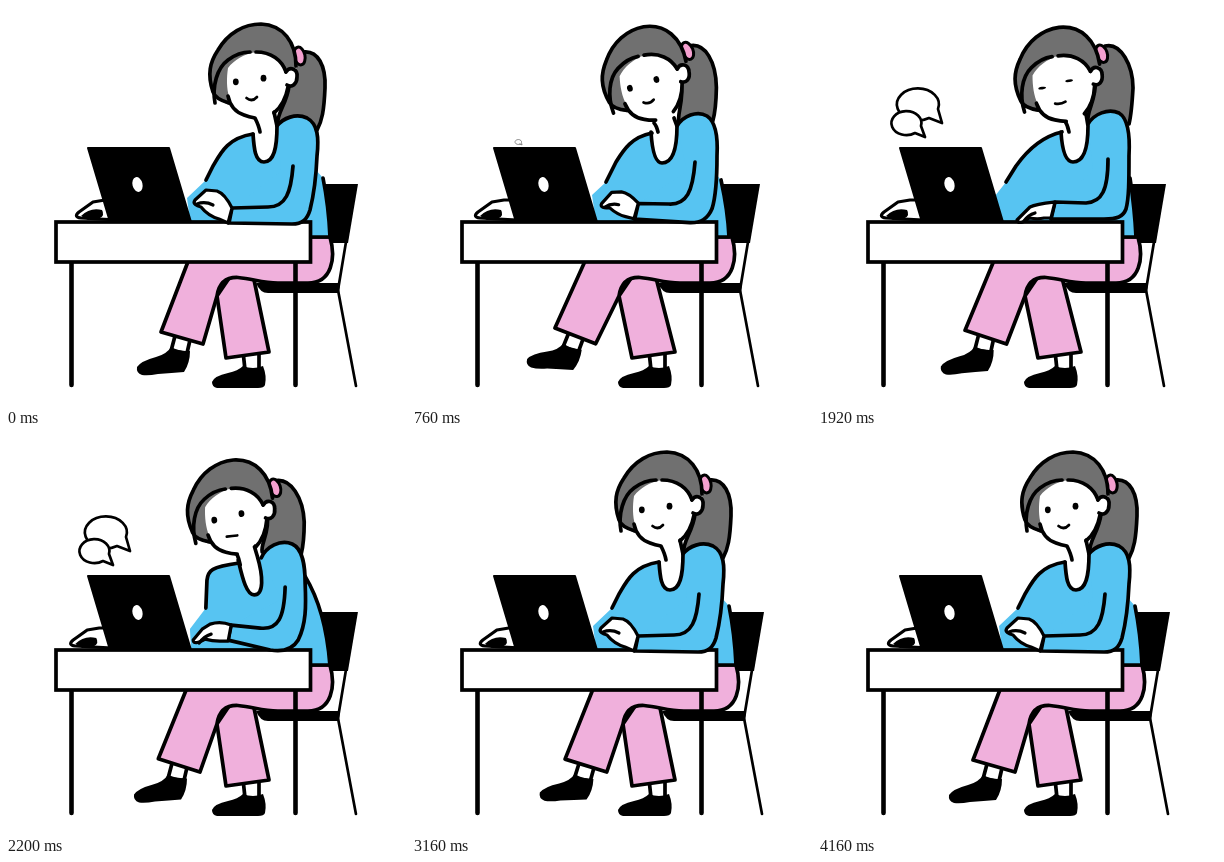
Recreate the animation shown at these times as an HTML page. Size 400 px wide and 400 px high, loop 4200 ms.

```html
<!DOCTYPE html>
<html lang="en">
<head>
<meta charset="utf-8">
<title>Chatting at the desk</title>
<style>
  html, body { margin: 0; width: 100%; height: 100%; overflow: hidden; background: #fff; }
  svg { display: block; width: 100%; height: 100%; }
  .ink { fill: none; stroke: #000; stroke-width: 3.7; stroke-linecap: round; stroke-linejoin: round; }
  .thin { stroke-width: 2.7; }
  .white { fill: #fff; }
  .blue { fill: #57c4f2; }
  .pink { fill: #f0b0dc; }
  .grey { fill: #707070; }
</style>
</head>
<body>
<svg viewBox="0 0 400 400">
  <g id="chair">
    <path d="M310 178H352L342 237H316Z"/>
    <path class="ink thin" d="M340 236L332 284L350 380"/>
    <path d="M250 277H334L333 287H262Q254 287 250 277Z"/>
  </g>

  <path class="ink white" d="M237 345L239 364H253V345"/>
  <path d="M206 376Q208 370 222 367Q232 365 237 360Q247 364 257 360Q261 370 259 379Q258 382 252 382H211Q206 381 206 376Z"/>
  <path id="leg" class="ink pink"/>
  <g id="foot">
    <path class="ink white" d="M169 330L165 345L181 347L184 334"/>
    <path d="M165 341Q174 346 184 345Q184 357 178 366Q166 367 152 368Q142 370 136 369Q130 367 131 361Q135 355 150 351Q161 348 165 341Z"/>
  </g>
  <path id="shin" class="ink pink"/>

  <path id="tail" class="ink grey"/>
  <path id="neck" class="white"/>
  <path id="trunk" class="blue"/>
  <path id="back" class="ink"/>
  <path id="left" class="ink"/>

  <g id="farHand">
    <path class="ink white" style="stroke-width:3.2" d="M112 214L75 212Q67 211 73 206L87 196L99 194H112"/>
    <path d="M75 210Q84 201 96 204Q99 209 94 212L82 214Z"/>
  </g>
  <path id="big" class="ink white thin" d="M111 112L124 117L120 103A21 16 0 1 0 111 112Z"/>
  <path id="small" class="ink white thin" d="M97 127L107 131L103 120A15 12 0 1 0 97 127Z"/>

  <path class="ink" style="stroke-width:4.6" d="M65.5 256V379M289.5 256V379"/>
  <rect class="ink white" style="stroke-linejoin:miter" x="50" y="216" width="254.5" height="40"/>
  <path d="M82 142H163L185 216H104Z" stroke="#000" stroke-width="2" stroke-linejoin="round"/>
  <ellipse class="white" cx="131.5" cy="178.5" rx="5" ry="7.5" transform="rotate(-14 131.5 178.5)"/>

  <path id="armFill" class="blue"/>
  <path id="arm" class="ink"/>
  <path id="collar" class="ink"/>
  <path id="throat" class="ink"/>

  <g id="head">
    <ellipse class="ink" style="fill:#f5a0d0;stroke-width:3" cx="293.5" cy="50" rx="5.5" ry="9" transform="rotate(-12 293.5 50)"/>
    <path class="grey" d="M207 86C201 68 204 56 212 44C222 27 238 18 255 18C277 19 290 36 290 62L279 68L226 100C219 98 210 93 207 86Z"/>
    <path class="white" d="M222 62C219 82 222 103 240 110C256 116 268 106 276 94C281 86 282 82 281 80V66C276 52 264 46 250 46C238 48 228 54 222 62Z"/>
    <path class="ink" d="M223 97C216 95 209 92 207 86C201 68 204 56 212 44C222 27 238 18 255 18C277 19 290 36 290 60"/>
    <path class="ink" d="M209 97C206 80 211 62 222 54C230 48 238 46 244 46"/>
    <path class="ink" d="M250 46C265 46 276 54 280 66"/>
    <path class="ink" d="M222 90C224 100 229 106 238 109Q243 111 249 112"/>
    <path class="ink" d="M282 81C280 92 275 101 268 107"/>
    <path class="ink white" d="M280 66C284 60 292 63 291 71C291 78 286 82 281 79"/>
    <ellipse class="eye" cx="229.8" cy="75.8"/>
    <ellipse class="eye" cx="257.5" cy="72.2"/>
    <path id="mouth" class="ink thin"/>
  </g>

  <path id="hand" class="ink white" style="stroke-width:3.2"/>
  <path id="finger" class="ink" style="stroke-width:3.2"/>
</svg>

<script>
const LOOP = 4200, STEP = 40;
const $ = id => document.getElementById(id);
const eyes = document.querySelectorAll('.eye');

// Body outlines; every pose shares the same path structure.
const upright = {
  left: '247 128 C222 132 215 146 207 160 L200 174',
  edge: '181 192',
  back: '324 231 C323 208 321 192 317 172',
  collar: '268 106 L271 120 C271 142 268 156 258 156 C249 156 248 142 247 128',
  throat: '249 112 C251 116 253 120 254 126',
  outer: '271 120 C277 112 290 107 301 112 C312 118 313 132 311 150 C310 175 307 192 304 204 C301 214 296 218 286 218 L223 217',
  inner: '287 160 C285 186 280 201 262 201 L226 202',
  hand: '226 202 C222 194 217 187 211 185 L200 184 L189 194 C186 198 191 200 195 201 C199 206 206 211 213 213 L222 217',
  finger: '191 198 Q199 195 207 199',
  tail: '297 46 C312 44 320 60 319 82 C318 105 316 115 311 124 L272 118 C270 108 281 98 283 80'
};
const swung = { ...upright,
  tail: '297 46 C313 44 323 60 323 82 C321 108 318 118 315 130 L272 118 C270 108 281 98 283 80'
};
const lean = { ...upright,
  left: '240 127 C220 131 212 143 204 156 L194 176',
  edge: '180 189',
  back: '317 231 C316 208 313 192 309 174',
  collar: '262 112 L265 120 C265 140 262 157 250 157 C243 157 240 142 239 126',
  throat: '242 117 C244 119 245 122 246 126',
  outer: '265 120 C271 110 285 104 295 110 C304 116 306 132 305 150 C305 175 304 192 301 204 C298 214 293 217 283 217 L223 217',
  inner: '283 157 C281 186 276 201 258 201 L226 202',
  tail: '276 40 C292 36 302 55 302 80 C302 95 301 105 299 112 L267 118 C264 108 272 95 268 75'
};
const type = { ...lean,
  outer: '265 120 C271 110 285 104 295 110 C304 116 306 132 305 150 C305 175 304 185 298 199 C290 212 278 217 266 216 L222 204',
  inner: '283 154 C280 184 272 194 254 191 L227 187',
  hand: '227 186 C220 187 212 186 206 188 L199 192 L191 206 C191 209 196 208 203 203 C208 204 212 205 215 205 L222 203',
  finger: '196 209 Q200 201 206 198',
  tail: '279 40 C297 36 309 60 310 85 C309 105 307 115 305 122 L267 118 C265 108 274 95 271 75'
};
const rest = {
  left: '244 126 C222 131 208 146 198 160 L188 176',
  edge: '177 190',
  back: '318 231 C317 208 315 192 312 172',
  collar: '268 108 L270 120 C270 142 266 156 255 156 C247 156 244 142 243 126',
  throat: '247 115 C249 118 250 121 251 126',
  outer: '270 118 C276 108 290 102 301 107 C311 113 312 132 311 150 C311 175 311 192 308 203 C305 211 299 213 286 213 L233 213',
  inner: '290 153 C290 184 284 196 268 197 L237 196',
  hand: '237 196 C228 197 218 198 212 201 L207 206 L199 214 C200 218 205 217 211 212 C217 213 222 213 226 212 L233 212',
  finger: '206 215 Q210 209 217 207',
  tail: '287 40 C303 36 315 60 315 82 C314 100 313 110 311 118 L270 116 C268 106 279 92 277 76'
};
const peer = {
  left: '233 129 C205 133 202 136 201 146 L200 174',
  edge: '184 195',
  back: '324 231 C322 205 316 170 299 142',
  collar: '248 112 L251 122 C257 142 258 161 248 161 C240 161 236 142 232 126',
  throat: '231 121 C232 123 233 126 234 131',
  outer: '255 124 C260 113 274 105 286 110 C297 115 299 132 299 150 C300 172 300 190 292 206 C286 216 276 218 264 216 L222 206',
  inner: '279 153 C278 184 272 196 254 194 L225 191',
  hand: '225 191 C218 188 210 188 204 190 L196 195 L187 206 C187 210 192 209 199 205 C206 207 210 207 214 207 L222 207',
  finger: '193 209 Q198 202 205 200',
  tail: '268 47 C285 43 297 65 298 88 C298 105 297 112 295 120 L256 118 C254 110 264 98 261 80'
};

const bodyKeys = [
  [0, upright], [40, upright], [360, lean], [600, lean], [1040, type], [1680, type],
  [1920, rest], [2220, peer], [2840, peer], [3160, upright], [3600, swung], [4160, upright], [LOOP, upright]
];
// x, y, tilt, eye opening, smile
const near = [243, 74, 0, 1, 1], down = [229.5, 80.5, -10, .6, .8], chat = [230.5, 78, -11, 1, .8];
const shut = [237, 78.5, -8, .25, .4], blank = [221, 83, -6, 1, 0];
const headKeys = [
  [0, near], [40, near], [360, down], [420, down], [700, chat], [1680, chat],
  [1900, shut], [1940, shut], [2220, blank], [2840, blank], [3160, near], [LOOP, near]
];
// shin angle, foot angle, far hand offset
const limbKeys = [
  [0, [0, 0, 0]], [400, [7.5, 2, -7]], [1160, [2.5, 2, -7]], [1920, [2.5, -3, -7]],
  [2560, [.5, 0, -4]], [3600, [1.7, 2, -1]], [4160, [0, 0, 0]], [LOOP, [0, 0, 0]]
];
const seatKeys = [[0, [0]], [40, [0]], [360, [-4]], [1920, [-4]], [2220, [0]], [LOOP, [0]]];
// rise, scale, tilt
const bigKeys = [[0, [45, 0, 0]], [680, [45, 0, 0]], [1000, [0, 1, 0]], [2860, [0, 1, 0]], [3060, [0, 0, 0]], [LOOP, [0, 0, 0]]];
const smallKeys = [[0, [40, 0, -20]], [880, [40, 0, -20]], [1160, [12, 1, -15]], [1440, [0, 1, 0]],
  [2860, [0, 1, 0]], [3060, [0, 0, 0]], [LOOP, [0, 0, 0]]];

const lerp = (a, b, k) => a + (b - a) * k;

function span(keys, t) {
  let i = 0;
  while (i < keys.length - 2 && t >= keys[i + 1][0]) i++;
  const [t0, a] = keys[i], [t1, b] = keys[i + 1];
  const k = Math.min(1, (t - t0) / (t1 - t0));
  return [a, b, k * k * (3 - 2 * k)];
}

function values(keys, t) {
  const [a, b, k] = span(keys, t);
  return a.map((v, i) => lerp(v, b[i], k));
}

function morph(a, b, k) {
  const to = b.match(/[\d.]+/g);
  let i = 0;
  return a.replace(/[\d.]+/g, n => lerp(+n, +to[i++], k).toFixed(2));
}

function turn(x, y, deg, cx, cy) {
  const r = deg * Math.PI / 180, c = Math.cos(r), s = Math.sin(r);
  return [cx + (x - cx) * c - (y - cy) * s, cy + (x - cx) * s + (y - cy) * c];
}

const draw = (id, d) => $(id).setAttribute('d', d);
const place = (id, tf) => $(id).setAttribute('transform', tf);

function drawBody(t) {
  const [a, b, k] = span(bodyKeys, t), p = {};
  for (const part in a) p[part] = morph(a[part], b[part], k);
  const cuff = p.outer.split('L')[1], neckline = p.collar.split('L')[1];
  draw('tail', `M${p.tail}`);
  draw('neck', `M${p.collar} L${p.throat.split(' C')[0]}Z`);
  draw('trunk', `M${p.left} L${p.edge} L186 231 L${p.back} L${neckline}Z`);
  draw('back', `M302 231 L${p.back}`);
  draw('armFill', `M${p.outer} L${p.inner.split('L')[1]} L275 165Z`);
  draw('arm', `M${p.outer} M${p.inner} L${cuff}`);
  draw('hand', `M${p.hand}Z`);
  for (const id of ['left', 'collar', 'throat', 'finger']) draw(id, `M${p[id]}`);
}

function drawHead(t) {
  const [x, y, tilt, open, smile] = values(headKeys, t);
  place('head', `translate(${x} ${y}) rotate(${tilt}) translate(-243 -74)`);
  for (const eye of eyes) {
    eye.setAttribute('rx', lerp(4.2, 2.9, open));
    eye.setAttribute('ry', lerp(.6, 3.4, open));
  }
  draw('mouth', `M240.5 ${93.5 - 1.5 * smile}Q246 ${93.5 + 3 * smile} 251 ${93.5 - 2.5 * smile}`);
}

function drawLegs(t) {
  const [s] = values(seatKeys, t), [shin, foot, reach] = values(limbKeys, t);
  const heel = turn(155, 326, shin, 195, 235), calf = turn(197, 338, shin, 195, 235);
  place('chair', `translate(${s} 0)`);
  draw('leg', `M${230 + s} 262L${211 + s} 290L220 352L263 346L${246 + s} 264Z`);
  draw('shin', `M${188 - shin * .8 + s} 240L${heel[0] + s} ${heel[1]}L${calf[0] + s} ${calf[1]}L${211 + s} 290` +
    `C${213 + s} 277 ${220 + s} 271 ${232 + s} 271.5C${248 + s} 273 ${256 + s} 277 ${272 + s} 277` +
    `L${302 + s} 277C${326 + s} 277 ${330 + s} 252 ${324 + s} 231H${296 + s}Z`);
  place('foot', `translate(${s} 0) rotate(${shin} 195 235) rotate(${foot} 176 336)`);
  place('farHand', `translate(${reach} 0)`);
}

function drawBubble(id, keys, t, x, y) {
  const [rise, size, tilt] = values(keys, t);
  place(id, `translate(${x + rise / 6} ${y + rise}) rotate(${tilt}) scale(${size}) translate(${-x} ${-y})`);
  $(id).style.visibility = size > .01 ? 'visible' : 'hidden';
}

function render(now) {
  const t = Math.floor(now % LOOP / STEP) * STEP;
  drawBody(t);
  drawHead(t);
  drawLegs(t);
  drawBubble('big', bigKeys, t, 100, 98);
  drawBubble('small', smallKeys, t, 89, 116);
}

let start;
function tick(now) {
  start ??= now;
  render(now - start);
  requestAnimationFrame(tick);
}
render(0);
requestAnimationFrame(tick);
</script>
</body>
</html>
```
